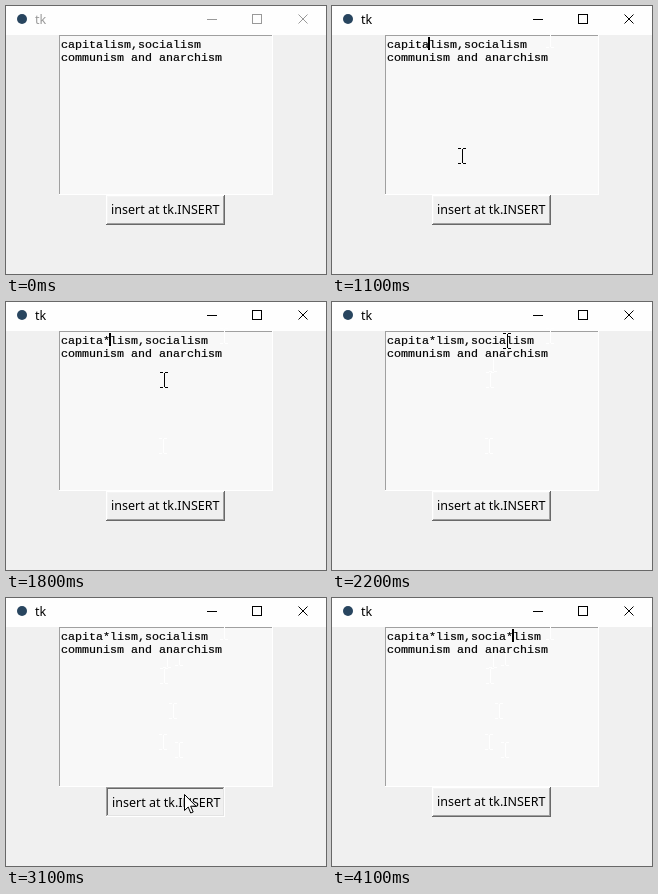
An HTML page for the animation above (4.7 s loop, 320 by 268 pixels).

```html
<!DOCTYPE html>
<html lang="en">
<head>
<meta charset="utf-8">
<title>tk</title>
<style>
  html, body { margin: 0; width: 100%; height: 100%; overflow: hidden; background: #f0f0f0; }
  svg { display: block; width: 100%; height: 100%; }
  text { white-space: pre; }
  .ui { font: 12.5px "Noto Sans", "Open Sans", sans-serif; }
  .mono { font: 11.665px "Liberation Mono", "DejaVu Sans Mono", monospace; stroke: #000; stroke-width: .2; }
  .crisp { shape-rendering: crispEdges; }
  .line { fill: none; stroke-width: 1; }
</style>
</head>
<body>
<svg viewBox="0 0 320 268" xmlns="http://www.w3.org/2000/svg">
  <defs>
    <path id="beam" class="line crisp" d="M-4 -7.5H-1M1 -7.5H4M.5 -7V7M-4 7.5H-1M1 7.5H4"/>
    <path id="arrow" d="M.5 .5V16.5L4.2 13L6.7 19L9.2 18L6.7 12.2H12Z" fill="#fff" stroke="#000" stroke-linejoin="round"/>
  </defs>

  <rect width="320" height="268" fill="#f0f0f0"/>
  <rect width="320" height="29" fill="#fefefe"/>
  <circle cx="16" cy="13" r="5" fill="#28455f"/>
  <text id="title" class="ui" x="29" y="18">tk</text>
  <g id="controls" class="line">
    <path class="crisp" d="M201 13.5H211M246.5 8.5H255.5V17.5H246.5Z"/>
    <path d="M292.5 8.5L301.5 17.5M301.5 8.5L292.5 17.5"/>
  </g>

  <g class="crisp">
    <rect x="53" y="29" width="214" height="160" fill="#f8f8f8"/>
    <path class="line" d="M53.5 188V29.5H267" stroke="#a0a0a0"/>
    <path class="line" d="M53 188.5H266.5V29" stroke="#fff"/>
  </g>
  <g id="traces" stroke="#fff"></g>
  <text id="first" class="mono" x="55" y="42"></text>
  <text class="mono" x="55" y="55">communism and anarchism</text>
  <rect id="caret" class="crisp" y="31" width="2" height="13"/>

  <g class="crisp">
    <rect x="100" y="189" width="119" height="30" fill="#f0f0f0"/>
    <path id="lit" class="line" d="M100.5 218V189.5H218"/>
    <path id="litInner" class="line" d="M101.5 217V190.5H217"/>
    <path id="shade" class="line" d="M100 218.5H218.5V189"/>
    <path id="shadeInner" class="line" d="M101 217.5H217.5V190"/>
  </g>
  <text id="label" class="ui" x="105" y="208">insert at tk.INSERT</text>
  <use id="pointer"/>
</svg>

<script>
const LOOP = 4700;
const $ = id => document.getElementById(id);
const set = (id, attrs) => {
  for (const name in attrs) $(id).setAttribute(name, attrs[name]);
};

// Pointer poses: time, shape, x, y, and 1 where a pale trace remains.
const poses = [
  [0, ""],
  [300, "arrow", 288, 25], [400, "arrow", 251, 26],
  [500, "beam", 218, 34, 1], [600, "beam", 160, 37],
  [700, "beam", 112, 38], [800, "beam", 100, 38],
  [1100, "beam", 130, 150], [1200, "beam", 150, 178],
  [1300, "arrow", 161, 212], [1400, "arrow", 159, 203],
  [1700, "beam", 157, 144, 1], [1800, "beam", 158, 78, 1],
  [1900, "beam", 161, 62, 1], [2000, "beam", 167, 48],
  [2100, "beam", 174, 39], [2200, "beam", 175, 39],
  [2400, "beam", 173, 60, 1], [2500, "beam", 167, 113, 1],
  [2600, "beam", 170, 137], [2700, "beam", 173, 152, 1],
  [2800, "arrow", 177, 191], [2900, "arrow", 178, 196],
  [3600, "arrow", 214, 193], [3700, "arrow", 258, 190],
  [3800, "arrow", 301, 186], [3900, ""]
];

// Spans in which the caret shows, and the column it stands at.
const blinks = [[800, 1400], [1700, 2200], [2600, 3000], [3300, 3900], [4100, LOOP]];
const columns = [[0, 6], [1600, 7], [2100, 17], [3300, 18]];
const presses = [[1500, 1600], [3100, 3300]];

const within = (spans, t) => spans.some(([from, to]) => t >= from && t < to);
const latest = (list, t) => list.filter(item => item[0] <= t).pop();
const place = (x, y) => `translate(${x} ${y})`;

const traces = poses.filter(pose => pose[4]).map(([time, , x, y], i, all) => {
  const node = document.createElementNS("http://www.w3.org/2000/svg", "use");
  node.setAttribute("href", "#beam");
  node.setAttribute("transform", place(x, y));
  $("traces").append(node);
  return { node, time };
});

function draw(t) {
  const active = t >= 800;
  set("title", { fill: active ? "#000" : "#999" });
  set("controls", { stroke: active ? "#000" : "#999" });

  $("first").textContent =
    `capita${t >= 1600 ? "*" : ""}lism,socia${t >= 3300 ? "*" : ""}lism`;
  set("caret", {
    x: 54 + 7 * latest(columns, t)[1],
    visibility: within(blinks, t) ? "visible" : "hidden"
  });

  const down = within(presses, t);
  set("lit", { stroke: down ? "#a0a0a0" : "#fff" });
  set("litInner", { stroke: down ? "#696969" : "#f4f4f4" });
  set("shade", { stroke: down ? "#fff" : "#696969" });
  set("shadeInner", { stroke: down ? "#e3e3e3" : "#a0a0a0" });
  set("label", { transform: down ? place(1, 1) : place(0, 0) });

  const [since, shape, x = 0, y = 0] = latest(poses, t);
  set("pointer", {
    href: "#" + shape,
    stroke: "#000",
    transform: place(x, y),
    visibility: shape ? "visible" : "hidden"
  });
  for (const { node, time } of traces) {
    node.setAttribute("visibility", t >= time && since !== time ? "visible" : "hidden");
  }
}

const start = performance.now();
function tick() {
  draw((performance.now() - start) % LOOP);
  requestAnimationFrame(tick);
}
tick();
</script>
</body>
</html>
```
